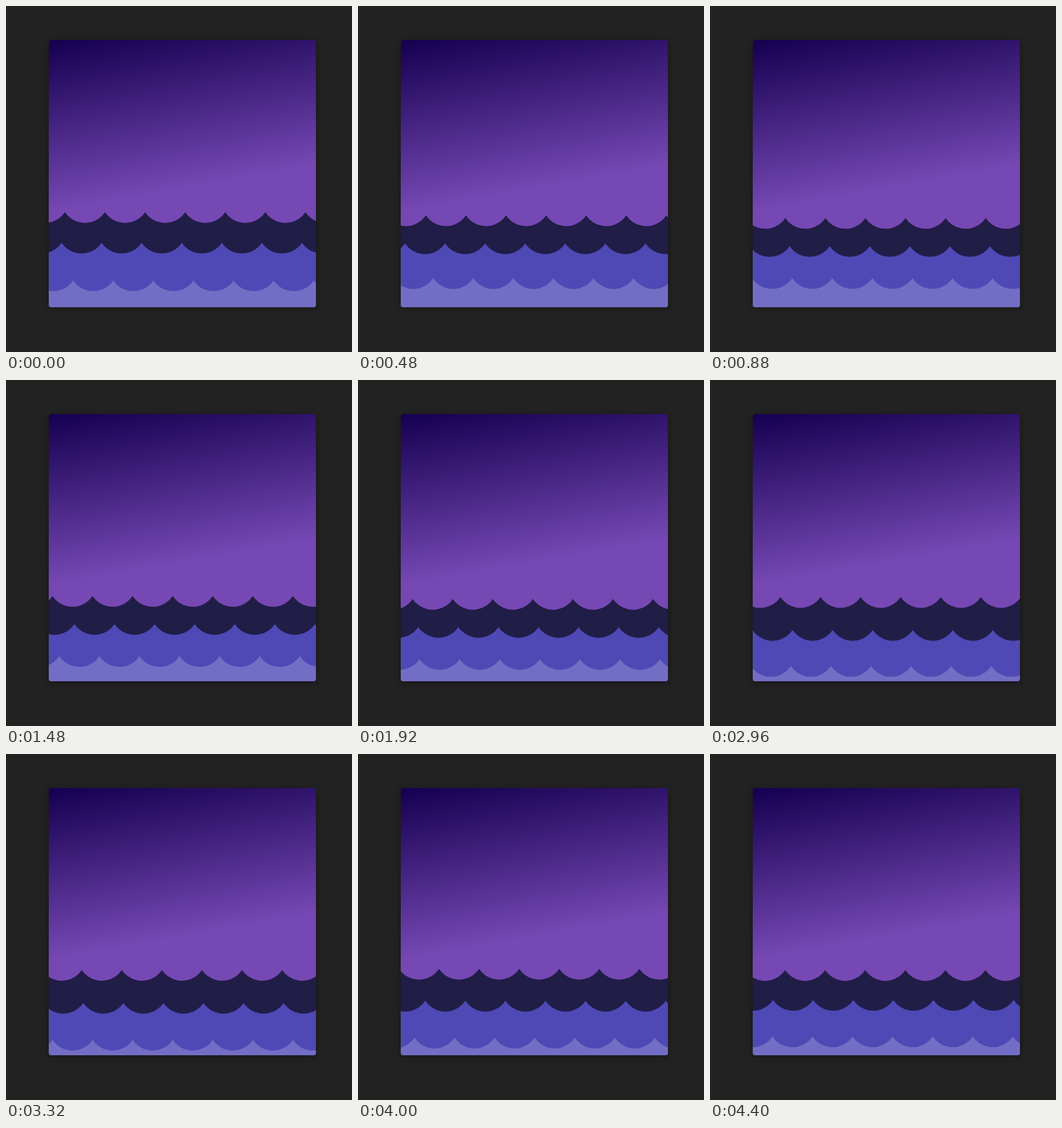
These frames come from a looping animation (518x518 px, 4440 ms). An HTML page with a canvas:

```html
<!DOCTYPE html>
<html>
<head>
<meta charset="utf-8">
<style>
  html, body { margin: 0; width: 100%; height: 100%; overflow: hidden; background: #222; }
  canvas {
    position: absolute; left: 64px; top: 51px; width: 400px; height: 400px;
    border-radius: 4px;
    background: linear-gradient(170deg, #150050, #7648b4 55%);
    box-shadow: 0 2px 10px rgba(0, 0, 0, .3);
  }
</style>
</head>
<body>
<canvas width="400" height="400"></canvas>
<script>
const ctx = document.querySelector('canvas').getContext('2d');
const LOOP = 4440, WIDTH = 60, DROP = 20;
const radius = Math.hypot(WIDTH / 2, DROP);
const angle = Math.atan2(DROP, WIDTH / 2);

// Shared path of a wave: time (ms), x, y, relative to its lowest point
const path = [
  [-4330, -115, -9.3], [-2330, -65, -23.3], [0, 0, 0], [1790, 39.4, -8.2], [3580, 0, 0]
];

// Each wave follows the path half a second after the one above
const waves = [
  { color: '#201d47', start: 2050, x: 21.4, y: 278.2, dir: 1 },
  { color: '#4f49b5', start: 2553, x: 8.6, y: 325.2, dir: -1 },
  { color: '#736ec5', start: 3050, x: 59.6, y: 378.2, dir: 1 }
];

function along(t) {
  const i = path.findIndex(p => p[0] > t);
  const a = path[i - 1], b = path[i];
  const k = (t - a[0]) / (b[0] - a[0]);
  return [a[1] + (b[1] - a[1]) * k, a[2] + (b[2] - a[2]) * k];
}

function drawWave({ color, start, x, y, dir }, t) {
  const [dx, dy] = along(t - start);
  const top = y + dy;
  const left = ((x + dir * dx) % WIDTH + WIDTH) % WIDTH - WIDTH;
  ctx.fillStyle = color;
  ctx.beginPath();
  ctx.moveTo(left, 400);
  for (let cx = left + WIDTH / 2; cx < 400 + WIDTH; cx += WIDTH)
    ctx.arc(cx, top - DROP, radius, Math.PI - angle, angle, true);
  ctx.lineTo(400 + WIDTH, 400);
  ctx.fill();
}

function frame() {
  let t = performance.now() % LOOP;
  if (t > 1040 && t < 1440) t = 1040; // brief stall, then a jump
  ctx.clearRect(0, 0, 400, 400);
  waves.forEach(w => drawWave(w, t));
  requestAnimationFrame(frame);
}
frame();
</script>
</body>
</html>
```
